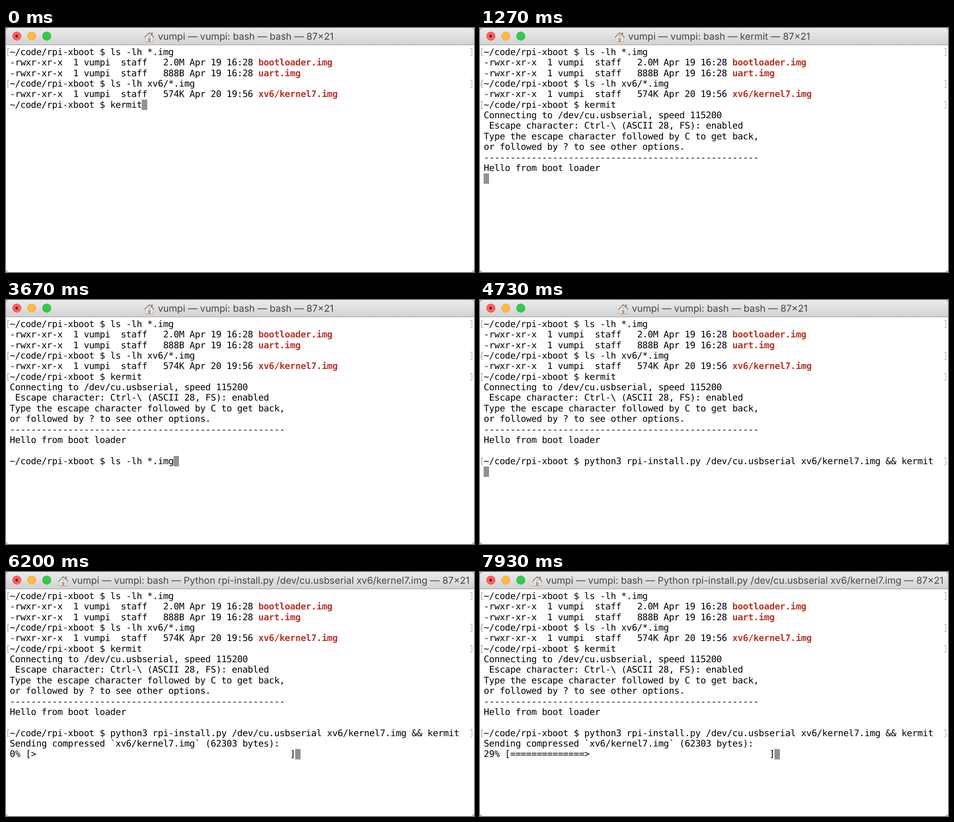
These frames come from a looping animation (1034x541 px, 8 s). An HTML page:

```html
<!DOCTYPE html>
<html lang="en">
<head>
<meta charset="utf-8">
<title>Terminal</title>
<style>
  :root { --col: 11.683px; --row: 23.37px; }
  html, body { margin: 0; width: 100%; height: 100%; overflow: hidden; background: #b4b4b4; }
  #window {
    position: absolute; left: 0; top: 0; width: 1034px; height: 541px;
    border-radius: 8px; overflow: hidden; background: #fff;
    text-rendering: geometricPrecision;
  }
  #bar {
    position: absolute; inset: 0 0 auto; height: 37px;
    background: linear-gradient(#ebebeb, #d2d2d2);
    border-bottom: 1.5px solid #929292;
  }
  .light {
    position: absolute; top: 8px; width: 20px; height: 20px;
    box-sizing: border-box; border-radius: 50%; border: 1px solid #0001;
  }
  .close { left: 13.5px; background: #fc5f5b; }
  .close::after {
    content: ""; position: absolute; left: 6.2px; top: 6.2px;
    width: 5.6px; height: 5.6px; border-radius: 50%; background: #4a0806;
  }
  .minimize { left: 47px; background: #fdb946; }
  .zoom { left: 80px; background: #36c84c; }
  #caption { position: absolute; left: 0; top: 0; }
  #caption svg { position: absolute; left: -31px; top: 8px; }
  #title {
    position: absolute; left: 0; top: 7px; white-space: pre; color: #464646;
    font: 21px/25px Inter, Roboto, sans-serif;
  }
  #screen, #cursor, #marks { position: absolute; left: 8.35px; top: 41.8px; }
  #screen {
    margin: 0; color: #000; white-space: pre;
    font: 20px/var(--row) "DejaVu Sans Mono", "Liberation Mono", monospace;
    letter-spacing: calc(var(--col) - 1ch);
    font-variant-ligatures: none;
  }
  #screen b { color: #bb3329; }
  #cursor { width: var(--col); height: var(--row); background: #919191; }
  #marks i {
    position: absolute; left: -5px; width: 1020px; height: 17px;
    --ink: linear-gradient(#a3a3a3, #a3a3a3);
    background:
      var(--ink) 0 0 / 1.5px 100%, var(--ink) 0 0 / 4px 1.5px, var(--ink) 0 100% / 4px 1.5px,
      var(--ink) 100% 0 / 1.5px 100%, var(--ink) 100% 0 / 4px 1.5px, var(--ink) 100% 100% / 4px 1.5px;
    background-repeat: no-repeat;
    width: 1027px;
  }
</style>
</head>
<body>
<div id="window">
  <div id="bar">
    <div class="light close"></div>
    <div class="light minimize"></div>
    <div class="light zoom"></div>
    <div id="caption">
      <svg width="23" height="24" viewBox="0 0 23 24">
        <path d="M16 2h3v7h-3z" fill="#a77a68"/>
        <path d="M3.5 11 11.5 4l8 7v11.5h-16z" fill="#efebe6" stroke="#a9a6a2" stroke-width=".8"/>
        <path d="M1 13 11.5 2.6 22 13" fill="none" stroke="#8f8f8f" stroke-width="2.4"/>
        <path d="M8.5 14h6v8.5h-6z" fill="#c79a7b"/>
        <path d="M9.7 9h3.6v3H9.7z" fill="#a9b3bb"/>
        <path d="M2.5 22.6h18" stroke="#9a9a94"/>
      </svg>
      <div id="title"></div>
    </div>
  </div>
  <div id="marks"></div>
  <div id="cursor"></div>
  <pre id="screen"></pre>
</div>
<script>
const LOOP = 8000, FRAME = 200 / 3;
const COL = 11.683, ROW = 23.37;
const USER = "vumpi";
const PROMPT = "~/code/rpi-xboot $ ";
const INSTALL = "rpi-install.py /dev/cu.usbserial xv6/kernel7.img";
const $ = id => document.getElementById(id);

const bash = { name: "bash", x: 335.5 };
const kermit = { name: "kermit", x: 327.5 };
const python = { name: "Python " + INSTALL, x: 145.5 };

const file = (size, date, name) => `-rwxr-xr-x  1 ${USER}  staff   ${size} Apr ${date} ${name}\n`;

const listing =
  PROMPT + "ls -lh *.img\n" +
  file("2.0M", "19 16:28", "bootloader.img") +
  file("888B", "19 16:28", "uart.img") +
  PROMPT + "ls -lh xv6/*.img\n" +
  file("574K", "20 19:56", "xv6/kernel7.img") +
  PROMPT + "kermit";
const connected = listing + "\n" +
  "Connecting to /dev/cu.usbserial, speed 115200\n" +
  " Escape character: Ctrl-\\ (ASCII 28, FS): enabled\n" +
  "Type the escape character followed by C to get back,\n" +
  "or followed by ? to see other options.\n" +
  "-".repeat(52) + "\n";
const hello = connected + "Hello from boot loader\n";
const prompt = hello + "\n" + PROMPT;
const install = prompt + "python3 " + INSTALL + " && kermit";
const sending = install + "\nSending compressed `xv6/kernel7.img` (62303 bytes):\n";

// start time, title, screen text
const steps = [
  [0, bash, listing],
  [930, bash, listing + "\n"],
  [1000, kermit, connected],
  [1200, kermit, hello],
  [2870, kermit, hello + "\n"],
  [2930, bash, prompt],
  [3270, bash, prompt + "kermit"],
  [3470, bash, prompt + "ls -lh xv6/*.img"],
  [3670, bash, prompt + "ls -lh *.img"],
  [3870, bash, install],
  [4730, bash, install + "\n"],
  [4870, python, install + "\n"],
  [6000, python, sending],
];

function progress(time) {
  const frame = Math.floor((time + 4) / FRAME);
  const percent = Math.max(0, Math.floor((frame - 93) * 1.115 + 0.6));
  const arrow = "=".repeat(percent / 2) + ">";
  return `${percent}% [${arrow.padEnd(49)}]`;
}

function paint(title, text) {
  const lines = text.split("\n");
  const last = lines.length - 1;
  $("screen").innerHTML = lines
    .map(line => line.replace(/&/g, "&amp;").replace(/>/g, "&gt;")
      .replace(/^(-rwx.* )(\S+)$/, "$1<b>$2</b>"))
    .join("\n");
  $("cursor").style.transform = `translate(${lines[last].length * COL}px, ${last * ROW}px)`;
  $("marks").innerHTML = lines
    .map((line, i) => i < last && line.startsWith(PROMPT) ? `<i style="top:${i * ROW + 3.5}px"></i>` : "")
    .join("");
  $("title").textContent = `${USER} — ${USER}: bash — ${title.name} — 87×21`;
  $("caption").style.left = title.x + "px";
}

let shown;
function tick(now) {
  const time = now % LOOP;
  const step = steps.findLast(([start]) => time >= start);
  const text = step[2] === sending ? sending + progress(time) : step[2];
  const key = step[0] + text;
  if (key !== shown) {
    paint(step[1], text);
    shown = key;
  }
  requestAnimationFrame(tick);
}
tick(0);
</script>
</body>
</html>
```
